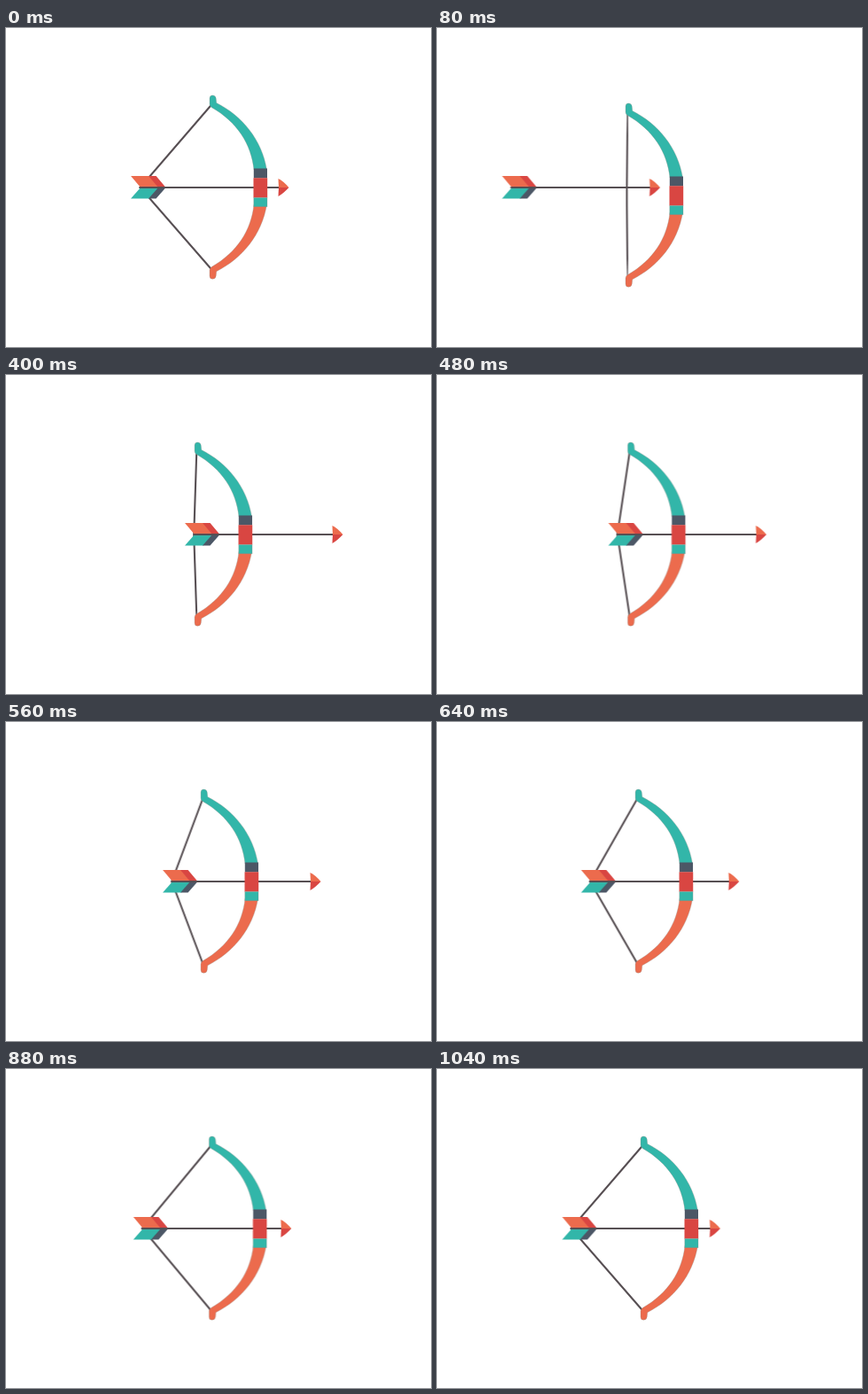
Recreate the animation shown at these times as an HTML page without scripts. Size 480x360 px, loop 1.12 s.

```html
<!DOCTYPE html>
<html lang="en">
<head>
<meta charset="utf-8">
<title>Bow and arrow</title>
<style>
  html, body { margin: 0; width: 100%; height: 100%; overflow: hidden; background: #fff; }
  svg { display: block; width: 480px; height: 360px; }
  .teal { fill: #32b6a9; }
  .orange { fill: #ec6b4d; }
  .red { fill: #d94642; }
  .navy { fill: #4c5766; }
  .cord { fill: none; stroke: #574f53; stroke-width: 2.1; vector-effect: non-scaling-stroke; }
  .limb { stroke: #8d8a84; stroke-opacity: .45; stroke-width: .7; }

  .bow, .string, .arrow {
    --pull: cubic-bezier(.22, .18, .32, 1);
    animation: 1.12s linear infinite;
  }
  .bow { animation-name: bow; }
  .arrow { animation-name: arrow; }
  .string { animation-name: string; transform-origin: 215.2px 180px; }

  /* drawn, hard release at 80 ms, settle until 400 ms, pull until 1040 ms */
  @keyframes bow {
    0%, 7.13% { transform: translate(17px, 0); }
    7.14% { transform: translate(0, 9px); animation-timing-function: ease-out; }
    35.71% { transform: translate(0, 0); animation-timing-function: var(--pull); }
    92.86%, 100% { transform: translate(17px, 0); }
  }
  @keyframes arrow {
    0%, 7.13% { transform: translateX(0); }
    7.14% { transform: translateX(-69px); animation-timing-function: ease-out; }
    21.43% { transform: translateX(63px); }
    35.71% { transform: translateX(61px); animation-timing-function: var(--pull); }
    92.86%, 100% { transform: translateX(.4px); }
  }
  @keyframes string {
    0%, 7.13% { transform: scaleX(1); }
    7.14% { transform: scaleX(.01); }
    35.71% { transform: scaleX(.037); animation-timing-function: var(--pull); }
    92.86%, 100% { transform: scaleX(1); }
  }
</style>
</head>
<body>
<svg viewBox="0 0 480 360">
  <defs>
    <path id="limb" d="M213 79.5Q213 75.900 216.200 75.900Q219.800 75.900 220.200 79.500L220.700 84.500C250 99.500 272 126 277.500 160H263C260 131 244 106 215 89.500Q213 88 213 86Z"/>
  </defs>

  <g class="bow">
    <path class="cord string" d="M215.200 86.500L134.500 180L215.200 272.500"/>
  </g>

  <g class="arrow">
    <path class="orange" d="M141 167H162L173 180H152Z"/>
    <path class="red" d="M161 167H169.500L180.500 180H172Z"/>
    <path class="teal" d="M141 192.500H162L173 180H152Z"/>
    <path class="navy" d="M161 192.500H169.500L180.500 180H172Z"/>
    <path class="cord" d="M150.500 180H309"/>
    <path class="orange" d="M307.500 170Q313 172.500 319.500 180H308Z"/>
    <path class="red" d="M308 180H319.500Q313 187 307.500 190Z"/>
  </g>

  <g class="bow">
    <use href="#limb" class="teal limb"/>
    <use href="#limb" class="orange limb" transform="matrix(1 0 0 -1 0 359.200)"/>
    <rect class="navy" x="262.800" y="158.500" width="15.200" height="11"/>
    <rect class="red" x="262.500" y="169.300" width="15.700" height="22.200"/>
    <rect class="teal limb" x="262.800" y="191.500" width="15.200" height="10.200"/>
  </g>
</svg>
</body>
</html>
```
